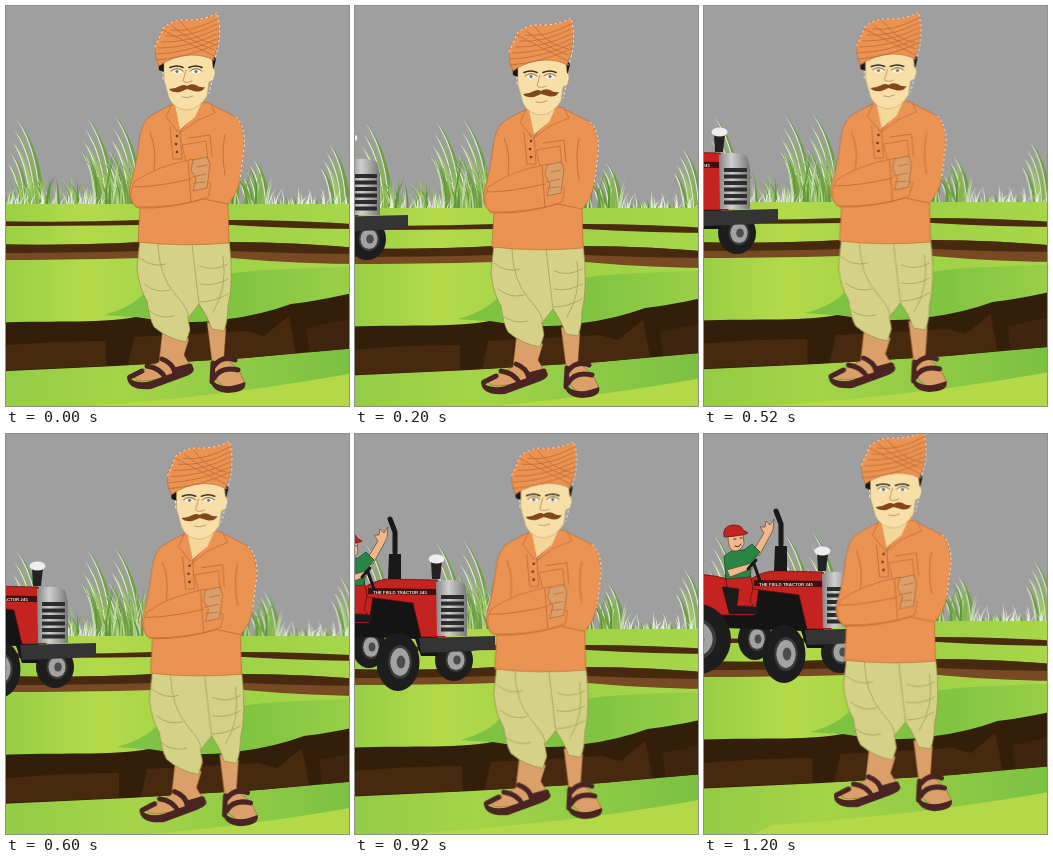
Write an HTML page that moves like this. It is 343 by 400 pixels and loops after 1400 ms.

```html
<!DOCTYPE html>
<html lang="en">
<head>
<meta charset="utf-8">
<title>Farmer and tractor</title>
<style>
html, body { margin: 0; width: 100%; height: 100%; overflow: hidden; background: #9f9f9f; }
svg { display: block; width: 100%; height: 100%; }
#man { transform-origin: 0 375px; }
.ln { fill: none; stroke-linecap: round; stroke-linejoin: round; }
.fold { stroke: #bf6a35; stroke-width: .8; }
.crease { stroke: #a3a05c; stroke-width: .8; }
.shirt { fill: #ea9352; stroke: #bf6a35; stroke-width: .7; }
.skin { fill: #dba069; stroke: #8b5128; stroke-width: .5; }
.strap { stroke: #4a2422; stroke-width: 5; }
.red { fill: #c4231f; stroke: #5c0d0c; stroke-width: .7; }
.tan { fill: #efb98d; stroke: #5a3418; stroke-width: .6; }
.green { fill: #288546; stroke: #124425; stroke-width: .7; }
.fringe { stroke: #f2f0e8; stroke-width: .9; stroke-dasharray: 2 3; }
text { font: bold 4.4px "Liberation Sans", Arial, sans-serif; fill: #f4e4dc; }
</style>
</head>
<body>
<svg viewBox="0 0 343 400" preserveAspectRatio="none">
  <defs>
    <linearGradient id="meadow">
      <stop offset="0" stop-color="#94cd43"/><stop offset=".25" stop-color="#b3da4b"/>
      <stop offset=".6" stop-color="#9fd247"/><stop offset="1" stop-color="#a9d749"/>
    </linearGradient>
    <linearGradient id="shade">
      <stop offset="0" stop-color="#7dc341"/><stop offset=".5" stop-color="#80c442"/><stop offset="1" stop-color="#9fd247"/>
    </linearGradient>
    <linearGradient id="front">
      <stop offset="0" stop-color="#92cb45"/><stop offset=".35" stop-color="#a5d449"/><stop offset="1" stop-color="#76bf41"/>
    </linearGradient>
    <linearGradient id="chrome">
      <stop offset="0" stop-color="#858585"/><stop offset=".4" stop-color="#cfcfcf"/><stop offset="1" stop-color="#777"/>
    </linearGradient>
  </defs>
  <g id="grassL"></g>
  <g id="grassR"></g>
  <g id="ground"></g>
  <g id="tractor"></g>
  <g id="man"></g>
</svg>
<script>
const $ = id => document.getElementById(id);
const fill = (color, d) => `<path fill="${color}" d="${d}"/>`;
const part = (cls, d) => `<path class="${cls}" d="${d}"/>`;
const line = (cls, d) => part('ln ' + cls, d);
const oval = (x, y, rx, ry, color) => `<ellipse cx="${x}" cy="${y}" rx="${rx}" ry="${ry}" fill="${color}"/>`;
const repeat = (n, make) => Array.from({ length: n }, (_, i) => make(i)).join('');

let seed = 11;
const rnd = () => (seed = seed * 16807 % 2147483647) / 2147483647;
const between = (a, b) => a + rnd() * (b - a);
const greens = ['#6f9f45', '#86b450', '#9cc765', '#5c943a', '#c3d9ac'];

// tapered blade rooted at x, with its tip shifted by lean
function blade(x, h, lean, w, color) {
  const base = 202, mid = base - h * .6;
  return fill(color, `M${x - w} ${base}Q${x - w} ${mid} ${x + lean} ${base - h}Q${x + w} ${mid} ${x + w} ${base}Z`);
}
const turf = (from, to, n, high) => repeat(n, i => {
  const h = between(.25, 1) * high;
  return blade(between(from, to), h, h * between(-.5, .3), between(.6, 1.4), greens[i % 5]);
});
const tuft = (x, h, n) => repeat(n, i => {
  const tall = h * (1 - i * .13), root = x - i * 5, lean = -tall * .27;
  return blade(root - 1, tall + 1, lean - 1, 2, '#e2eed6') + blade(root, tall, lean, 2, greens[i % 3]);
});
const spray = (from, to, n) => repeat(n, () => blade(between(from, to), between(6, 22), between(-5, 9), .6, '#eaf0e2'));

$('grassL').innerHTML = tuft(36, 89, 5) + tuft(107, 90, 4) + tuft(135, 92, 5) +
  turf(-15, 90, 80, 34) + turf(88, 142, 65, 58) + spray(-15, 100, 45);
$('grassR').innerHTML = tuft(262, 48, 5) + tuft(342, 63, 4) +
  turf(218, 262, 30, 45) + turf(262, 363, 35, 13) + spray(262, 363, 40);

// strip across the field, passing through left, middle and right heights
const strip = (color, left, mid, right, thick, end = thick) =>
  fill(color, `M-20 ${left}Q60 ${left + 2} 135 ${mid}H225Q290 ${mid} 363 ${right}v${end}` +
    `Q290 ${right + end} 225 ${mid + thick}H135Q60 ${left + thick} -20 ${left + thick}Z`);

$('ground').innerHTML =
  fill('url(#meadow)', 'M-20 198H363V440H-20Z') +
  strip('#4b2b10', 215, 214, 219, 5, 4) +
  strip('#784a24', 238, 236, 243, 16, 15) +
  strip('#472910', 238, 236, 243, 9, 5) +
  fill('url(#shade)', 'M98 309Q130 300 140 284Q220 266 260 264T363 260V300L220 318Z') +
  fill('url(#front)', 'M-20 355L363 332V440H-20Z') +
  fill('#b3d849', 'M60 402Q230 390 363 364V440H-20Z') +
  fill('#331e09', 'M-20 317C40 314 90 318 130 311Q185 320 222 313 255 309 285 298 320 294 363 283V341L240 352 110 360-20 366Z') +
  fill('#46290f', 'M-20 341Q40 335 100 335V360L-20 365ZM128 331L240 325 258 330 283 310 290 347 240 352 122 359Z') +
  fill('#3f250f', 'M300 322L363 309V341L303 346Z');

const wheel = (x, y, rx, ry) =>
  oval(x, y, rx, ry, '#1d1d1d') + oval(x + 2, y, rx * .55, ry * .58, '#3a3a3a') +
  oval(x + 2, y, rx * .45, ry * .48, '#a2a2a2') + oval(x + 3, y, rx * .2, ry * .22, '#4c4c4c');

const driver =
  part('red', 'M6 151L31 149 34 164 31 178 35 182H18L20 165 8 163Z') +
  part('tan', 'M34 127L45 109 41 103 46 103 47 97 51 101 55 95 54 106 40 132Z') +
  part('green', 'M5 132L14 126H25L33 120 41 128 33 138 31 153 7 155Z') +
  part('tan', 'M8 146L33 139 34 144 11 153Z') +
  part('tan', 'M9 112L24 109 25 120Q21 128 15 127T9 112Z') +
  line('', 'M15 115h2M21 114h2M16 122Q20 124 22 120" stroke="#35200f') +
  part('red', 'M5 113Q3 102 14 101 23 101 24 106L29 109Q24 112 5 113Z') +
  line('', 'M29 145L37 136M35 140L41 157" stroke="#191919" stroke-width="3');

$('tractor').innerHTML =
  wheel(36, 215, 17, 21) + wheel(121, 228, 19, 21) +
  fill('#141414', 'M-20 162H105V224H88L82 207-20 203Z') +
  part('red', 'M-50 153Q-20 146 12 156L40 163 36 191H-50Z') +
  fill('#1b1b1b', 'M3 163L19 162 23 182 39 183V190H10Z') +
  part('red', 'M32 155Q44 147 57 147L104 148 112 162V205H88Q83 184 80 171L34 165Z') +
  fill('#3c1110', 'M35 156L103 157V163L35 162Z') +
  '<text x="40" y="161.500">THE FIELD TRACTOR 245</text>' +
  fill('url(#chrome)', 'M103 150Q118 145 131 151L134 163V204H104Z') +
  repeat(6, i => fill('#2c2c2c', `M108 ${163 + i * 6.5}h23v4h-23z`)) +
  fill('#343434', 'M86 206L162 204V216L138 219 88 221Z') +
  fill('#222', 'M98 129h11l-2 18h-8z') + oval(103.5, 127, 8, 4.5, '#eee') +
  line('', 'M62 143V123M62 120V100L57 87" stroke="#191919" stroke-width="5') +
  fill('#191919', 'M56 122H68V147H55Z') +
  wheel(-25, 215, 37, 36) + wheel(65, 230, 21.5, 29) + driver;

const legs =
  part('skin', 'M157 320L183 333 178 349 185 361 171 371 137 375Q126 375 129 368L153 356Z') +
  part('skin', 'M201 316L220 322 218 351 233 364 239 377 222 384 208 372Z') +
  fill('#4a2422', 'M121 370Q130 379 145 375L186 360Q192 366 178 371L145 383Q121 385 121 370ZM204 372Q215 386 239 376 242 386 222 387 205 386 204 372Z') +
  line('strap', 'M141 360Q155 362 160 373M156 353Q167 357 169 367M169 364L184 360M124 371L136 365M208 360Q216 349 229 354M208 372Q215 360 232 364M207 357L206 376');

const dhoti =
  '<path fill="#d5d287" stroke="#918e4c" stroke-width=".7" d="M134 232L131 262Q133 282 141 295 143 312 148 321 162 333 180 336L184 324 182 312 193 298Q201 309 206 323L218 325Q222 315 222 300 228 277 223 232Z"/>' +
  line('crease', 'M152 238Q153 270 169 288T182 312M186 238L193 298M217 250Q222 282 207 306') +
  repeat(3, i => line('crease', `M${134 + i * 4} ${252 + i * 26}q12 10 26 6M222 ${258 + i * 15}q-14 8-28 ${2 + i * 3}`));

const shirt =
  fill('#f5d69b', 'M168 90H198L196 113 174 132 165 108Z') +
  part('shirt', 'M165 99Q150 106 142 112 135 119 133 136 130 162 124 180 121 192 130 201L134 202 132 236Q176 241 223 237L222 198Q232 187 234 173L238 143Q239 120 230 111L202 97 188 113 171 126Z') +
  part('shirt', 'M176 139L200 135 202 155 181 160Z') +
  line('fold', 'M144 127Q151 143 148 164M219 128Q215 146 219 169M183 132L204 129 206 151M164 121L167 153H176L174 124M134 202Q164 203 198 193L222 198') +
  part('shirt', 'M128 176Q150 160 188 153L192 171 205 178 202 191Q171 202 131 201 120 193 128 176Z') +
  line('fold', 'M127 181Q151 181 185 173M182 155L185 196') +
  part('skin', 'M187 154L201 151 204 158 201 182 187 185 190 173 185 164Z') +
  line('fold', 'M186 171L200 168M191 161l10-2M188 177l11-1') +
  part('shirt', 'M167 96L160 111 171 125 181 113Z') +
  part('shirt', 'M196 96L204 97 209 107 190 115 173 128Z') +
  fill('#f5d69b', 'M169 99L195 98 189 111 174 123Z') +
  repeat(3, i => oval(171 - i % 2, 130 + i * 8, 1.3, 1.3, '#70391f'));

const eye = x => fill('#fff', `M${x - 5} 66q5-4 10 0q-5 3-10 0z`) + oval(x, 65.5, 1.6, 1.6, '#5d7581') +
  line('', `M${x - 6} 65q6-5 12 0" stroke="#4c4031" stroke-width=".7`) +
  line('', `M${x - 7} 61.500q7-3 13 0" stroke="#31251b" stroke-width="1.600`);

const head =
  fill('#191614', 'M152 52H163L160 67 153 64ZM204 46L210 53 207 66H203Z') +
  '<path fill="#f8dfa8" stroke="#b69c66" stroke-width=".5" d="M158 45H205L207 62Q211 64 207 74L203 76 201 90Q193 103 181 104 168 103 163 92L158 74Z"/>' +
  eye(171) + eye(190) +
  line('', 'M180 64L177 75Q181 78 186 75M176 91Q181 93 187 90" stroke="#b08c55" stroke-width=".8') +
  fill('#80461c', 'M163 83Q169 83 174 80 178 78 181 80 185 77 190 79 194 82 199 81 196 87 188 85L181 83 174 86Q166 87 163 83Z') +
  line('fringe', 'M208 67L203 87M157 66V75');

const turban =
  part('shirt', 'M153 60Q148 50 149 39 154 29 158 21 168 13 181 14 200 14 211 7L213 16Q214 38 207 54 199 49 185 49 166 50 153 60Z') +
  repeat(6, i => line('fold', `M${150 + i * i * .6} ${54 - i * 6}Q${180 + i} ${52 - i * 5} ${211} ${38 - i * 5}`)) +
  repeat(3, i => line('fold', `M${157 + i * 9} ${24 - i * 4}Q${180 + i * 4} ${36 - i} 208 ${50 - i * 6}`)) +
  line('fringe', 'M149 41L158 21Q169 13 181 14 200 14 211 7L213 16Q215 39 208 54M230 111Q240 121 238 143L234 174');

$('man').innerHTML = legs + dhoti + shirt + head + turban;

// camera jolt, farmer's stretch and tractor travel, one pose per step
const stepTime = 200;
const joltX = [0, 5, 3.5, 13, 7.5, 8.5, 8.5];
const joltY = [0, 5, -1, 5, -2, 0, -10];
const stretch = [0, 0, 0, 5, -2.5, -2.5, 0];
const travel = [-178, -109, -88, -72, -22, 0, 15];

const move = (x, y) => `translate(${x}px, ${y}px)`;
const poses = {
  ground: i => move(joltX[i], joltY[i] - (i && 1)),
  grassL: i => move(0, joltY[i] - (i && 1)),
  grassR: i => move(joltX[i] * .8, joltY[i] - (i && 1)),
  tractor: i => move(travel[i], joltY[i]),
  man: i => move(joltX[i] - stretch[i] * .1, joltY[i]) + ` scaleY(${1 + stretch[i] / 368})`
};

const count = joltX.length;
for (const [id, pose] of Object.entries(poses)) {
  const steps = Array.from({ length: count + 1 }, (_, i) => ({
    offset: i / count, transform: pose(i % count), easing: 'steps(1, end)'
  }));
  $(id).animate(steps, { duration: stepTime * count, iterations: Infinity }).startTime = 0;
}
</script>
</body>
</html>
```
